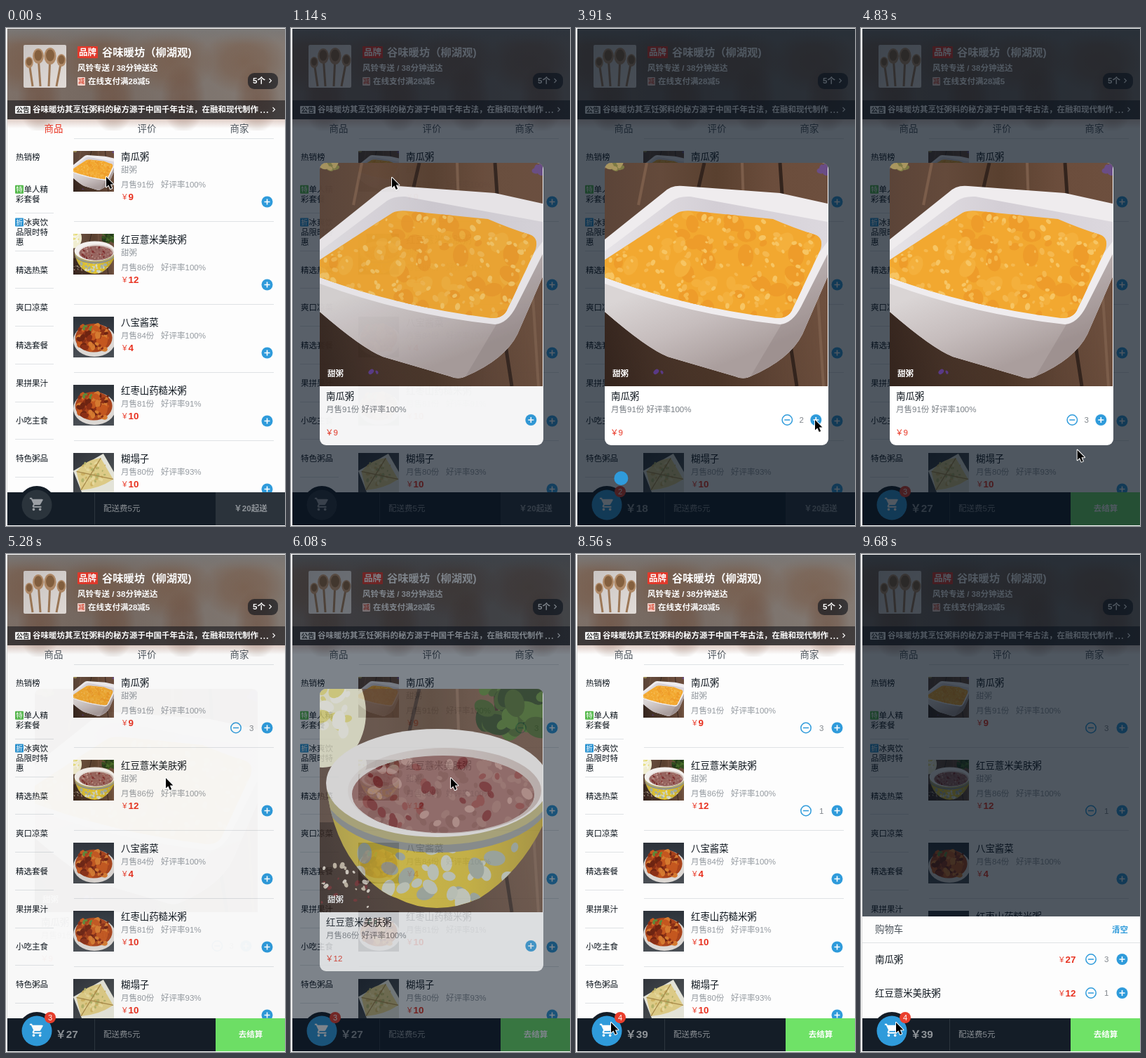
Animation, 398 px wide and 709 px high, one loop 9780 ms. Source, as an HTML page with a canvas:

```html
<!DOCTYPE html>
<html lang="zh">
<head>
<meta charset="utf-8">
<style>
html, body { margin: 0; height: 100%; overflow: hidden; background: #fff; }
canvas { display: block; }
</style>
</head>
<body>
<canvas id="stage" width="398" height="709"></canvas>
<script>
const W = 398, H = 709, LOOP = 9780;
const FONT = '"Liberation Sans", "Noto Sans CJK SC", "Noto Sans CJK", sans-serif';
const RED = '#e8311f', BLUE = '#2f9bdb', INK = '#0d151d', GREY = '#93999f', LINE = '#dfe2e5';
const MASK = 'rgba(7,18,31,.7)';
const stage = document.getElementById('stage').getContext('2d');
const layer = Object.assign(document.createElement('canvas'), { width: W, height: H }).getContext('2d');
let g = stage, t = 0, seed = 1;

const goods = [
  { name: '南瓜粥', desc: '甜粥', sold: 91, rate: 100, price: 9, top: 175, art: pumpkin },
  { name: '红豆薏米美肤粥', desc: '甜粥', sold: 86, rate: 100, price: 12, top: 293, art: beans },
  { name: '八宝酱菜', sold: 84, rate: 100, price: 4, top: 411, art: pickles },
  { name: '红枣山药糙米粥', sold: 81, rate: 91, price: 10, top: 508, art: pickles },
  { name: '糊塌子', sold: 80, rate: 93, price: 10, top: 605, art: pancake }
];
const menu = ['热销榜', '单人精|彩套餐', '冰爽饮|品限时特|惠', '精选热菜', '爽口凉菜', '精选套餐', '果拼果汁', '小吃主食', '特色粥品'];
const clicks = [[2650, 0], [3540, 0], [4180, 0], [6920, 1]];   // time, item
const popups = [[790, 4890, 0], [5860, 7530, 1]];              // open, close, item
const pointer = [[0, 143, 212], [50, 144, 213], [1300, 144, 213], [1770, 270, 543], [2350, 341, 558], [4690, 341, 558],
  [4890, 300, 612], [5280, 228, 319], [6150, 228, 319], [6690, 341, 558], [7120, 341, 558], [7480, 259, 622],
  [7900, 259, 622], [8560, 50, 667]];

// timing
const clamp = v => Math.max(0, Math.min(1, v));
function bezier(p, x1, y1, x2, y2) {
  const at = (u, a, b) => 3 * (1 - u) ** 2 * u * a + 3 * (1 - u) * u * u * b + u ** 3;
  let lo = 0, hi = 1;
  for (let i = 0; i < 20; i++) {
    const mid = (lo + hi) / 2;
    if (at(mid, x1, x2) < p) lo = mid; else hi = mid;
  }
  return at(lo, y1, y2);
}
const ease = (start, length) => {
  const p = clamp((t - start) / length);
  return p === 0 || p === 1 ? p : bezier(p, .25, .1, .25, 1);
};
const count = i => clicks.filter(c => c[1] === i && t >= c[0]).length;

// drawing helpers
function rect(x, y, w, h, color, radius = 0) {
  g.fillStyle = color;
  g.beginPath();
  g.roundRect(x, y, w, h, radius);
  g.fill();
}
function oval(x, y, rx, ry, color, turn = 0) {
  g.fillStyle = color;
  g.beginPath();
  g.ellipse(x, y, rx, ry, turn, 0, 7);
  g.fill();
}
function fill(d, color) {
  g.fillStyle = color;
  g.fill(new Path2D(d));
}
function stroke(d, color, width) {
  g.strokeStyle = color;
  g.lineWidth = width;
  g.stroke(new Path2D(d));
}
function gradient(x0, y0, x1, y1, ...colors) {
  const paint = g.createLinearGradient(x0, y0, x1, y1);
  colors.forEach((c, i) => paint.addColorStop(i / (colors.length - 1), c));
  return paint;
}
function glow(x, y, rx, ry, rgb, alpha) {
  g.save();
  g.translate(x, y);
  g.scale(rx, ry);
  const paint = g.createRadialGradient(0, 0, 0, 0, 0, 1);
  paint.addColorStop(0, `rgba(${rgb},${alpha})`);
  paint.addColorStop(.5, `rgba(${rgb},${alpha * .75})`);
  paint.addColorStop(1, `rgba(${rgb},0)`);
  oval(0, 0, 1, 1, paint);
  g.restore();
}
// y is the vertical centre of the glyphs
function text(s, x, y, size, color, bold = false, align = 'left') {
  g.font = `${bold ? 'bold ' : ''}${size}px ${FONT}`;
  g.textAlign = align;
  g.fillStyle = color;
  g.fillText(s, x, y + size * .37);
}
function price(n, x, y) {
  text('￥', x, y, 10.5, RED);
  text(n, x + 10.5, y, 13.4, RED, true);
}
function chevron(x, y) {
  stroke(`M${x - 1.5} ${y - 3}l3 3l-3 3`, '#fff', 1.1);
}

// food pictures, drawn on a 318 unit square
function random() {
  return (seed = seed * 16807 % 2147483647) / 2147483647;
}
function scatter(n, x, y, w, h, r, ...colors) {
  for (let i = 0; i < n; i++) {
    const size = r * (.5 + random());
    oval(x + random() * w, y + random() * h, size, size * .7, colors[i % colors.length], random() * 3);
  }
}
function within(d, draw) {
  g.save();
  g.clip(new Path2D(d));
  draw();
  g.restore();
}
function wood() {
  rect(0, 0, 318, 318, gradient(0, 0, 318, 0, '#5b4438', '#644a3b', '#59402f', '#6b4d3c', '#6d4f3e'));
  rect(0, 190, 318, 128, gradient(0, 318, 318, 240, 'rgba(44,30,24,.85)', 'rgba(60,42,32,.5)', 'rgba(110,80,62,.6)'));
  stroke('M142 0L128 60M250 0L254 60M262 240L274 318', '#33241d', 5);
  stroke('M60 0L48 60M196 0L198 60M304 190L312 318', '#7b5d4a', 4);
}
function pumpkin() {
  const soup = 'M0 138L71 92L104 71Q112 67 130 69L240 80Q270 93 302 103Q312 108 308 123L268 208Q262 222 244 221Q110 204 0 163Z';
  const base = 'V162L282 244Q264 280 208 304Q198 309 186 304L90 276Q60 264 0 212Z';
  wood();
  scatter(12, 0, 0, 24, 12, 6, '#7d7a44', '#a9965f');
  scatter(6, 308, 6, 10, 10, 4, '#6a4d86');
  fill('M0 109L84 42Q95 31 112 33L250 43L318 58' + base, '#efecee');
  fill('M0 126L96 54Q106 47 122 48L318 84V112L306 128L300 104L120 70L0 138Z', gradient(0, 0, 318, 0, '#e6e3e7', '#d3ced5', '#dcd8de'));
  fill('M0 172Q120 216 250 230Q268 228 280 205L318 130' + base, gradient(60, 180, 110, 310, '#dad5d5', '#c6bdbd', '#aa9e9d'));
  fill('M252 230Q268 228 280 205L318 130V162L282 244Q264 280 208 304Z', 'rgba(120,104,104,.25)');
  fill(soup, '#f2a830');
  within(soup, () => {
    scatter(60, 0, 70, 310, 150, 11, '#ee9c2a', '#f4b03c');
    scatter(190, 0, 75, 310, 135, 3.6, '#f7c563', '#f5b84e');
  });
  scatter(5, 72, 295, 10, 5, 3.5, '#5a3a86');
}
function beans() {
  const body = 'M10 140Q18 215 60 262Q85 290 110 298Q165 326 228 298Q285 262 318 195V130Z';
  wood();
  oval(4, 34, 62, 78, '#f0edd0');
  scatter(18, 0, 0, 40, 80, 9, '#e6dc78', '#f7f6ea');
  scatter(50, 235, -10, 90, 65, 15, '#344f20', '#456a28', '#22381a');
  fill(body, gradient(0, 0, 318, 0, '#b9a53c', '#e2c634', '#dcbf30', '#b59b2e'));
  within(body, () => {
    scatter(40, 20, 225, 290, 80, 11, '#ccd2c2', '#a3ada0', '#d6d9c8');
    oval(168, 149, 164, 84, '#8b8f8c');
    oval(168, 142, 164, 80, '#b5ac74');
  });
  oval(168, 134, 159, 77, '#f3f0ee');
  oval(178, 145, 138, 61, gradient(40, 0, 316, 0, '#ebe5e2', '#dccfca', '#cdbcb6'));
  oval(176, 150, 130, 55, '#976560');
  within('M46 150a130 55 0 1 0 260 0a130 55 0 1 0-260 0z', () => {
    scatter(90, 50, 97, 258, 106, 7, '#a3736b', '#8b5852');
    scatter(54, 60, 102, 238, 92, 6.5, '#7d2c2c', '#934642', '#bd9087');
  });
  scatter(30, 0, 250, 70, 65, 3.2, '#e6dccd', '#6d2424', '#cfbfa8');
}
function pickles() {
  rect(0, 0, 318, 318, gradient(0, 0, 0, 318, '#2c323a', '#4a4f55'));
  oval(165, 185, 165, 128, '#dcd8d4');
  oval(160, 165, 145, 112, '#a9441c');
  scatter(75, 45, 75, 225, 175, 22, '#d57a30', '#8a2f16', '#c4571f', '#6d2412');
  scatter(6, 80, 55, 60, 50, 11, '#5d8a3a');
}
function pancake() {
  rect(0, 0, 318, 318, gradient(0, 0, 318, 318, '#30343b', '#54585a'));
  fill('M0 140L235 5L318 150V318H70Z', '#e3e3d8');
  fill('M25 145Q100 50 215 40L312 205Q200 280 60 290Z', '#dcca86');
  scatter(40, 70, 80, 180, 170, 12, '#e6d89c', '#cdb264', '#b3b26a');
  stroke('M25 145L312 205M215 40L60 290', '#a88a4a', 7);
}
function picture(item, x, y, size) {
  seed = 77;
  g.save();
  g.translate(x, y);
  g.scale(size / 318, size / 318);
  g.beginPath();
  g.rect(0, 0, 318, 318);
  g.clip();
  item.art();
  g.restore();
}

// parts of the page
function spoon(x, y, size, foot) {
  stroke(`M${x} ${y}L${foot} 83`, '#9c7756', 3);
  oval(x, y, size * .72, size, '#b08a68');
  oval(x, y - 1, size * .5, size * .7, '#84603f');
}
function header() {
  g.save();
  g.beginPath();
  g.rect(2, 1, 396, 145);
  g.clip();
  rect(2, 1, 396, 129, gradient(2, 0, 398, 0, '#7d7068', '#756860', '#7d746e', '#847a73'));
  for (const x of [30, 135, 235, 340]) {
    glow(x, 48, 62, 46, '118,84,62', .55);
    glow(x + 18, 100, 32, 50, '108,74,56', .5);
  }
  rect(2, 1, 396, 22, gradient(0, 1, 0, 23, 'rgba(120,120,120,.8)', 'rgba(120,120,120,0)'));
  rect(2, 130, 396, 13, gradient(0, 130, 0, 143, 'rgba(196,160,146,.5)', 'rgba(196,160,146,0)'));
  g.restore();

  rect(25, 24, 61, 61, gradient(25, 24, 86, 85, '#c9c4c2', '#e2dcd8'), 2);
  spoon(33, 49, 8, 38);
  spoon(46, 40, 11, 49);
  spoon(63, 40, 12, 61);
  spoon(79, 46, 9, 72);

  rect(102, 26, 29, 17, '#e23a2c', 1);
  text('品牌', 116.5, 34.5, 12.5, '#fff', true, 'center');
  text('谷味暖坊（柳湖观)', 137, 34, 15.3, '#fff', true);
  text('风铃专送 / 38分钟送达', 102, 57, 11.5, '#fff', true);
  rect(102, 70, 11, 12, '#f2d5cd', 1);
  text('减', 107.5, 76, 9, '#d8503c', true, 'center');
  text('在线支付满28减5', 117, 76, 11.5, '#fff', true);
  rect(345, 64, 43, 23, 'rgba(22,24,30,.68)', 9);
  text('5个', 352, 75, 11.5, '#fff', true);
  chevron(377, 75);

  rect(2, 103, 396, 27, 'rgba(22,22,28,.6)');
  rect(13, 111, 22, 11, '#f4f4f4', 1);
  text('公告', 24, 116.5, 9.5, '#333', true, 'center');
  text('谷味暖坊其烹饪粥料的秘方源于中国千年古法，在融和现代制作', 38, 116, 11.5, '#fff', true);
  for (let i = 0; i < 3; i++) oval(364 + i * 4.4, 120, 1, 1, '#fff');
  chevron(382, 116);
}

function plus(x, y) {
  oval(x, y, 8, 8, BLUE);
  stroke(`M${x - 4} ${y}h8M${x} ${y - 4}v8`, '#fff', 1.6);
}
function stepper(x, y, i, gap = 44.5) {
  plus(x, y);
  const n = count(i);
  if (!n) return;
  const p = ease(clicks.find(c => c[1] === i)[0], 400);
  g.save();
  g.globalAlpha *= p;
  g.translate(x - gap + 23 * (1 - p), y);
  g.rotate(Math.PI * (1 - p));
  stroke('M7.2 0A7.2 7.2 0 1 1-7.2 0A7.2 7.2 0 1 1 7.2 0M-4 0h8', BLUE, 1.5);
  g.restore();
  text(n, x - gap / 2, y, 11.5, '#80868c', false, 'center');
}

function sidebar() {
  menu.forEach((label, i) => {
    const lines = label.split('|'), mid = 183.3 + i * 53.7;
    lines.forEach((s, k) => {
      const y = mid + (k - (lines.length - 1) / 2) * 13.6;
      const icon = k === 0 && { 1: ['特', '#55b94c'], 2: ['折', '#2f95d2'] }[i];
      if (icon) {
        rect(13, y - 6.5, 12, 12, icon[1], 1);
        text(icon[0], 19, y - .5, 9.5, '#fff', false, 'center');
      }
      text(s, icon ? 25.5 : 14, y, 11.5, INK);
    });
    if (i) rect(13, Math.round(mid + 26), 55, 1, LINE);
  });
}

function goodsList() {
  goods.forEach((item, i) => {
    const { top, desc } = item, gap = desc ? 21 : 0;
    if (i) rect(97, top - 18, 285, 1, LINE);
    picture(item, 96, top, 58);
    text(item.name, 164, top + 8, 13.4, INK);
    if (desc) text(desc, 164, top + 27, 11.5, GREY);
    text(`月售${item.sold}份`, 164, top + 27 + gap, 11.5, GREY);
    text(`好评率${item.rate}%`, 221, top + 27 + gap, 11.5, GREY);
    price(item.price, 164, top + 44.5 + gap);
    stepper(372.5, top + 51.5 + gap, i);
  });
}

function page() {
  rect(0, 0, W, H, '#fff');
  rect(2, 1, 396, 707, '#fdfdfd');
  rect(1, 1, 1, 707, '#dcdcdc');
  header();
  text('商品', 68, 143, 13.4, t < 800 ? RED : '#4d555d', false, 'center');
  text('评价', 201, 143, 13.4, '#4d555d', false, 'center');
  text('商家', 333, 143, 13.4, '#4d555d', false, 'center');
  rect(97, 157, 285, 1, LINE);
  sidebar();
  goodsList();
}

function mask(alpha, height) {
  g.globalAlpha = alpha;
  rect(2, 1, 396, height, MASK);
  g.globalAlpha = 1;
}

function cartList() {
  const p = ease(9230, 440);
  if (!p) return;
  mask(p, 660);
  g.save();
  g.translate(0, 145 * (1 - p));
  rect(2, 516, 396, 145, '#fdfdfd');
  text('购物车', 20, 534, 13.4, '#4d555d');
  text('清空', 381, 535, 11.5, BLUE, true, 'right');
  rect(2, 553, 396, 1, LINE);
  [0, 1].forEach(i => {
    const y = 577 + i * 48;
    text(goods[i].name, 20, y, 13.4, INK);
    price(goods[i].price * count(i), 281, y);
    stepper(372.5, y, i);
  });
  g.restore();
}

function bar() {
  const n = count(0) + count(1), total = count(0) * 9 + count(1) * 12, ready = total >= 20;
  oval(44, 679, 27, 27, '#141d27');
  rect(2, 661, 396, 47, '#141d27');
  rect(126, 662, 1, 45, '#2c353e');
  rect(299, 661, 99, 47, ready ? '#6fe267' : '#2b333b');
  text(ready ? '去结算' : '￥20起送', 349, 684, 11.5, ready ? '#fff' : '#90959a', true, 'center');
  text('配送费5元', 139, 684, 11.5, '#8a8f94');
  oval(44, 679, 21.5, 21.5, n ? BLUE : '#2b343c');
  g.save();
  g.translate(33, 667);
  g.scale(.92, .92);
  fill('M7 18a2 2 0 1 0 .01 0zM1 2v2h2l3.6 7.59-1.35 2.45C4.52 15.37 5.48 17 7 17h12v-2H7.42l1.1-2h7.45c.75 0 1.41-.41 1.75-1.03L21.7 4.96 20 4H5.21L4.27 2zM17 18a2 2 0 1 0 .01 0z', n ? '#fff' : '#9b9fa4');
  g.restore();
  if (!n) return;
  text('￥' + total, 70.5, 683, 15.3, '#8f9499', true);
  oval(63, 660, 8, 8, '#ea3f2d');
  text(n, 63, 660, 11, '#fff', false, 'center');
}

function popup([open, close, i]) {
  const alpha = ease(open, 500) - ease(close, 500), item = goods[i];
  if (alpha <= 0) return;
  mask(alpha, 707);
  // the card is composed apart so that it fades as one piece
  g = layer;
  g.clearRect(0, 0, W, H);
  g.save();
  g.beginPath();
  g.roundRect(41, 192, 319, 402, 9);
  g.clip();
  rect(41, 192, 319, 402, '#fff');
  picture(item, 41, 192, 318);
  text(item.desc, 52, 492, 11.5, '#fff', true);
  text(item.name, 50, 524, 13.4, INK);
  text(`月售${item.sold}份 好评率${item.rate}%`, 50, 543, 11.5, '#777d83');
  text('￥' + item.price, 49, 576, 11.5, RED);
  stepper(342.3, 558, i, 41);
  g.restore();
  g = stage;
  g.globalAlpha = alpha;
  g.drawImage(layer.canvas, 0, 0);
  g.globalAlpha = 1;
}

function balls() {
  for (const [start] of clicks) {
    const p = (t - start) / 400;
    if (p >= 0 && p < 1) oval(338 - 295 * p, 533 + 143 * bezier(p, .49, -.29, .75, .1), 10, 10, BLUE);
  }
}

function cursor() {
  let k = pointer.findIndex(key => key[0] > t);
  if (k < 0) k = pointer.length;
  const [t0, x0, y0] = pointer[k - 1], [t1, x1, y1] = pointer[k] || [LOOP, x0, y0];
  const p = clamp((t - t0) / (t1 - t0)), s = p * p * (3 - 2 * p);
  g.save();
  g.translate(x0 + (x1 - x0) * s, y0 + (y1 - y0) * s);
  const arrow = 'M0 0V14.5L3.4 11.4L5.8 17L8.2 16L5.8 10.6H10.4Z';
  g.lineJoin = 'round';
  stroke(arrow, '#fff', 2);
  fill(arrow, '#000');
  g.restore();
}

function frame() {
  t = performance.now() % LOOP;
  page();
  cartList();
  bar();
  popups.forEach(popup);
  balls();
  cursor();
  requestAnimationFrame(frame);
}
frame();
</script>
</body>
</html>
```
